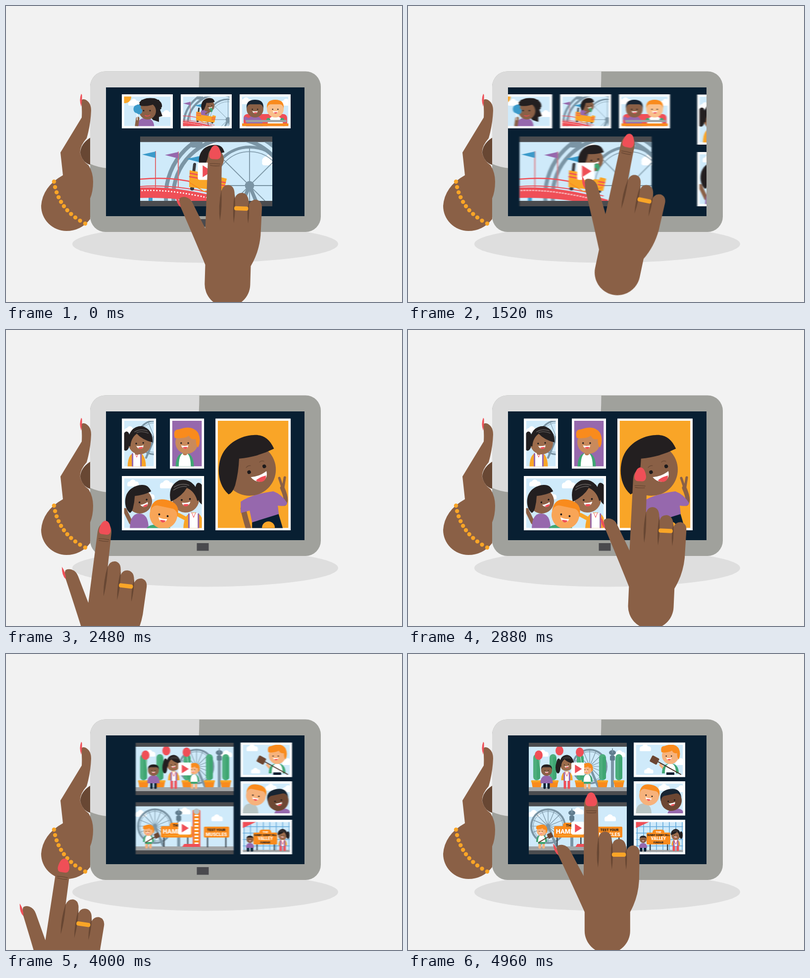
Write an HTML page that moves like this. It is 800 px wide and 600 px high and loops after 5 s.

```html
<!DOCTYPE html>
<html lang="en">
<head>
<meta charset="utf-8">
<title>Tablet photo album</title>
<style>
html, body { margin: 0; width: 100%; height: 100%; overflow: hidden; background: #f2f2f2; }
svg { display: block; }
#stage { width: 800px; height: 600px; }
text { font: 900 8px Roboto, sans-serif; text-anchor: middle; }
</style>
</head>
<body>
<svg id="stage" viewBox="0 0 800 600">
  <defs>
    <clipPath id="screen"><rect x="202" y="165" width="401" height="261"/></clipPath>
    <clipPath id="case"><rect x="170" y="132.500" width="466" height="325.500" rx="31"/></clipPath>
    <filter id="blur" filterUnits="userSpaceOnUse" x="180" y="160" width="446" height="270" color-interpolation-filters="sRGB">
      <feGaussianBlur id="smear" stdDeviation="0 0"/>
    </filter>
  </defs>
  <ellipse cx="402.500" cy="482.500" rx="268.500" ry="38" fill="#dedede"/>
  <g clip-path="url(#case)">
    <rect x="170" y="132" width="466" height="327" fill="#a0a19c"/>
    <path d="M170 132H390.500Q390.500 150 389.500 170L206 329Q185 327 170 320Z" fill="#dbdbdb"/>
  </g>
  <rect x="202" y="165" width="401" height="261" fill="#081f32"/>
  <rect x="385.500" y="432" width="24" height="15.500" fill="#4a4a4e"/>
  <g clip-path="url(#screen)"><g id="lens"><g id="strip"></g></g></g>
  <g id="holder"></g>
  <g id="pointer"></g>
</svg>
<script>
const $ = id => document.getElementById(id);
const DARK = '#8a6046', SHADE = '#684733', TAN = '#9c6c4c', FAIR = '#f6b27c';
const INK = '#231f20', NAVY = '#081f32', RED = '#ef4f57', GOLD = '#f9a527', GINGER = '#f98b1d';
const SKY = '#cfeafa', STEEL = '#7b95a5', PURPLE = '#9668ad', GREEN = '#3fa673', BLUE = '#3b9aca';

// Drawing helpers
const rect = (x, y, w, h, f, r = 0) => `<rect x="${x}" y="${y}" width="${w}" height="${h}" rx="${r}" fill="${f}"/>`;
const dot = (x, y, r, f, ry = r) => `<ellipse cx="${x}" cy="${y}" rx="${r}" ry="${ry}" fill="${f}"/>`;
const shape = (d, f) => `<path d="${d}" fill="${f}"/>`;
const line = (d, c, w, more = '') => `<path d="${d}" fill="none" stroke="${c}" stroke-width="${w}" stroke-linecap="round" ${more}/>`;
const group = (t, s) => `<g transform="${t}">${s}</g>`;
const label = (x, y, s, size, f) => `<text x="${x}" y="${y}" style="font-size:${size}px" fill="${f}">${s}</text>`;
const range = (n, fn) => Array.from({ length: n }, (_, i) => fn(i)).join('');
const crop = (x, y, w, h, bg, s) =>
  `<svg x="${x}" y="${y}" width="${w}" height="${h}" viewBox="${x} ${y} ${w} ${h}">${rect(x, y, w, h, bg)}${s}</svg>`;
const photo = (x, y, w, h, bg, s) => rect(x, y, w, h, '#fff') + crop(x + 4.5, y + 4.5, w - 9, h - 9, bg, s);
const video = (x, y, w, h, bar, s) =>
  rect(x, y, w, h, '#4b4c4f') + crop(x, y + bar, w, h - 2 * bar, SKY, s);
const cloud = (x, y, s = 1) => group(`translate(${x} ${y}) scale(${s})`,
  dot(-6, 0, 5, '#fff') + dot(0, -3, 6, '#fff') + dot(7, 0, 5, '#fff') + rect(-11, 0, 23, 5, '#fff', 2.5));
const play = (x, y, s) => rect(x - s / 2, y - s / 2, s, s, '#fff', s / 9) +
  shape(`M${x - s * .22} ${y - s * .34}L${x + s * .32} ${y}L${x - s * .22} ${y + s * .34}Z`, RED);
const torso = (x, y, w, h, f) =>
  shape(`M${x - w / 2} ${y + h}Q${x - w / 2} ${y} ${x} ${y}Q${x + w / 2} ${y} ${x + w / 2} ${y + h}Z`, f);

// Heads are drawn in a unit circle
const HAIR = {
  bob: 'M.93-.8C.75-1.2.5-1.35.15-1.32C-.35-1.3-.9-1-1.1-.45C-1.25 0-1.2.6-.8.95Q-.65.9-.55.6Q-.42.1-.4-.42Q.3-.48.93-.8Z',
  girl: 'M1.13-.1Q1.1-1.3.1-1.5Q-1.1-1.45-1.08.3L-.8.35Q-.8-.4-.3-.8Q.2-.3 1.13-.1Z',
  quiff: 'M-1.05-.4Q-1.25-1.15-.7-1.15Q.5-1.6 1-.85Q1.3-.2 1 .45Q.8.3.8-.3Q.35-.2.2-.6Q-.3-.3-1.05-.4Z',
  cap: 'M-1-.05Q-1.1-1.12 0-1.12Q1.1-1.12 1-.05Q.95-.5.6-.58L-.6-.58Q-.95-.5-1-.05Z'
};
const FACE = {
  bob: 'translate(.27 -.015) rotate(-21)',
  girl: 'translate(0 .02) rotate(-8)',
  quiff: 'translate(-.18 .05)',
  cap: 'translate(0 .02)'
};

function head(x, y, r, skin, hair, style, tilt = 0, flip = 1) {
  const girl = style === 'girl';
  const tail = girl ? dot(-1.2, -.1, .36, hair, .85) : '';
  const glint = girl ? line('M-.5-.95Q0-1.3.6-1.1M-.3-.9Q.1-1.1.7-.9', '#5f5a58', .06) : '';
  const face = group(FACE[style],
    dot(-.31, 0, .07, '#1d1a1b') + dot(.31, 0, .07, '#1d1a1b') +
    shape('M-.32.2Q0 .3.32.2Q.28.5.02.5Q-.22.48-.32.2Z', '#fff') +
    shape('M-.18.39Q0 .32.24.35Q.2.52.02.52Q-.1.5-.18.39Z', RED));
  return group(`translate(${x} ${y}) rotate(${tilt}) scale(${r * flip} ${r})`,
    tail + dot(0, 0, 1, skin) + shape(HAIR[style], hair) + glint + face);
}

function wheel(x, y, r, w, n = 8) {
  const spokes = range(n, i => {
    const a = i * Math.PI / n, c = Math.cos(a) * r, s = Math.sin(a) * r;
    return line(`M${x - c} ${y - s}L${x + c} ${y + s}`, STEEL, w * .3);
  });
  const ring = (q, k) => `<circle cx="${x}" cy="${y}" r="${q}" fill="none" stroke="${STEEL}" stroke-width="${k}"/>`;
  return ring(r, w) + ring(r * .88, w * .25) + spokes + dot(x, y, r * .12, STEEL) +
    line(`M${x - r * .5} ${y + r * 1.2}L${x} ${y}L${x + r * .5} ${y + r * 1.2}`, STEEL, w * 1.2);
}

const flag = (x, y, c, pole) => (pole ? line(`M${x} ${y}V367`, '#dd6f75', 2) : '') +
  shape(`M${x} ${y}L${x - 27} ${y + 6}L${x} ${y + 13}Z`, c);

// Roller coaster, drawn at video size and reused as a thumbnail
const coaster = cloud(537, 314, 1.8) + cloud(415, 285) +
  [132, 117].map(r => `<circle cx="455" cy="385" r="${r}" fill="none" stroke="${STEEL}" stroke-width="8"/>`).join('') +
  rect(372, 270, 25, 17, STEEL, 5) + wheel(492, 364, 78, 6, 4) +
  flag(302, 295, BLUE, 1) + flag(348, 296, PURPLE, 1) + flag(392, 304, BLUE) +
  line('M271 351Q335 345 385 359', RED, 2.5) + rect(288, 385, 8, 12, BLUE) +
  line('M271 366Q340 360 440 385', RED, 2) +
  shape('M271 368Q350 364 450 393V408Q350 386 271 389Z', RED) +
  line('M275 374Q345 371 440 397', '#fff', 3, 'stroke-dasharray="0 6"') +
  torso(400, 322, 27, 30, PURPLE) + head(417, 311, 23, DARK, INK, 'bob', 10) +
  dot(427, 327, 6, GREEN, 8) + line('M407 341L424 331', DARK, 6) +
  line('M381 321L379 338', '#3b3b3f', 6) + dot(376, 370, 4, '#3b3b3f') + dot(432, 375, 4, '#3b3b3f') +
  shape('M371 333L388 336L390 346L432 352L434 347L446 350L440 375L370 367Z', GOLD) +
  line('M372 339L387 342M371 346L388 349M431 356L443 358M430 362L442 364', RED, 2.5) +
  line('M371 358L400 376L438 368', GINGER, 2);

const pageA =
  photo(234, 179, 103, 69, SKY, cloud(324, 220) + cloud(258, 197) + dot(240, 184, 13, GOLD) +
    torso(282, 227, 35, 20, PURPLE) +
    shape('M269 196Q277 184 300 187Q317 193 315 205L310 207L316 223L309 225L309 235L297 231Z', INK) +
    dot(286, 213, 17, DARK) + shape('M268 202Q290 205 302 197L304 216L314 208L309 190L274 190Z', INK) +
    dot(278, 212, 1.6, INK) + dot(291, 212, 1.6, INK) + line('M281 222Q286 225 291 221', RED, 1.5) +
    line('M264 242L266 228', DARK, 7) + line('M265 231V215', '#fff', 1.5) +
    dot(264, 209, 6.5, BLUE, 8) + dot(269, 213, 6.5, BLUE) + dot(267, 205, 5.5, BLUE)) +
  photo(353, 179, 103, 69, SKY, group('translate(187.8 37.4) scale(.53)', coaster)) +
  photo(472, 179, 103, 69, SKY, cloud(485, 194) + cloud(566, 197) + rect(480, 219, 88, 25, RED, 8) +
    torso(502, 223, 34, 22, PURPLE) + torso(544, 223, 32, 22, '#fff') +
    head(503, 209, 17, DARK, '#172432', 'cap') + head(544, 209, 17, '#f9c08b', GINGER, 'cap') +
    dot(530, 231, 4, GREEN) + dot(558, 231, 4, GREEN) + line('M484 228L495 234', PURPLE, 7) +
    rect(484, 231, 83, 4.500, '#9fa4a5', 2) + rect(477, 238, 94, 8, GINGER)) +
  video(271, 264.5, 267, 141.5, 11, coaster) + play(405, 335, 35);

const jacket = (x, y, w, h) => torso(x, y, w, h, GOLD) + rect(x - w * .2, y + 1, w * .4, h, '#fff') +
  line(`M${x - w * .23} ${y + 3}V${y + h}M${x + w * .23} ${y + 3}V${y + h}`, PURPLE, 3) +
  line(`M${x - 4} ${y}L${x} ${y + 10}L${x + 4} ${y}`, RED, 1);
const tee = (x, y, w, h) => torso(x, y, w, h, GREEN) + torso(x, y, w * .66, h, '#fff');

const pageB =
  photo(234, 179.5, 69, 101.5, SKY, wheel(300, 218, 34, 3.5) + cloud(250, 204) +
    jacket(264, 248, 37, 30) + rect(260, 244, 9, 9, TAN, 4) + head(270, 229, 23, TAN, INK, 'girl', 3)) +
  photo(331, 179.5, 69, 101.5, PURPLE,
    tee(361, 249, 37, 29) + rect(357, 246, 9, 8, '#b97c51', 4) + head(365, 228, 23, '#c98a5c', GINGER, 'quiff')) +
  photo(234, 296, 166, 110, SKY, cloud(288, 338) + cloud(324, 315, 1.2) + cloud(256, 312) +
    line('M252 390L240 365', DARK, 8) + torso(269, 372, 38, 32, PURPLE) + head(270, 347, 25, DARK, INK, 'bob') +
    line('M349 375L366 384', GOLD, 8) + jacket(379, 370, 42, 36) +
    head(363, 343, 27, TAN, INK, 'girl', -15, -1) +
    torso(308, 394, 52, 14, GREEN) + head(318, 375, 28, '#f8a557', GINGER, 'cap', 12)) +
  photo(423, 179.5, 152, 226.5, GOLD,
    line('M479 362Q484 385 490 403', DARK, 11) +
    line('M562 352Q569 345 558 320', DARK, 9) +
    line('M558 318L552 300M560 318L563 299', DARK, 5) +
    shape('M497 386L550 371L560 405L497 407Z', NAVY) + dot(530, 401, 13, GOLD) +
    shape('M474 348Q495 333 540 327Q557 333 568 351Q566 359 549 356L551 373L497 390L492 366L474 371Z', PURPLE) +
    head(492, 283, 53, DARK, INK, 'bob') + line('M485 279Q489 274 494 275M512 268Q515 264 521 266', SHADE, 1.2));

const tower = (x, y, base) => rect(x - 3, y, 6, base - y, STEEL) + dot(x, y, 7, '#617d8e', 5) +
  rect(x - 5, y + 6, 10, 10, '#617d8e', 2) + line(`M${x} ${y}V${y - 8}`, STEEL, 2);
const tree = x => rect(x - 7, 203, 14, 53, '#4cae7d', 7) + rect(x, 208, 7, 46, GREEN, 4) +
  shape(`M${x - 11} 256H${x + 11}L${x + 8} 272H${x - 8}Z`, GINGER) + rect(x - 11, 256, 22, 4, GOLD);
const balloon = (x, y, hx) => line(`M${x} ${y}L${hx} 246`, '#fff', .8) + dot(x, y, 8, RED, 9.5);
const legs = (x, y, h, c) => line(`M${x - 4} ${y}V${y + h}M${x + 4} ${y}V${y + h}`, c, 5);
const post = (x, y, h) => rect(x, y, 2.5, h, '#3e4850');
const ground = (y, h) => rect(244, y, 198, h, '#a2a5a6');

const pageC =
  video(244, 180, 198, 106, 8, cloud(272, 203) + cloud(427, 204) + wheel(367, 228, 34, 4) + tower(413, 200, 270) +
    [260, 293, 348, 393, 426].map(tree).join('') + ground(270, 9) +
    balloon(264, 205, 269) + balloon(306, 196, 310) + balloon(347, 199, 354) +
    legs(280, 260, 11, NAVY) + torso(280, 246, 25, 16, PURPLE) + head(280, 236, 11, DARK, INK, 'cap') +
    legs(321, 254, 17, RED) + jacket(321, 238, 23, 18) + dot(303, 230, 5, INK, 12) + head(320, 224, 13, TAN, INK, 'girl') +
    legs(362, 258, 13, FAIR) + rect(355, 257, 14, 6, GREEN) + tee(362, 244, 22, 15) + head(362, 234, 10, FAIR, GINGER, 'quiff')) +
  play(343, 233, 26) +
  video(244, 300.5, 198, 105.5, 8, cloud(408, 334) + cloud(343, 320) + cloud(254, 325) +
    wheel(283, 349, 34, 4) + tower(331, 322, 391) + ground(390, 9) +
    post(300, 365, 26) + post(348, 365, 26) + rect(313, 342, 25, 15, GINGER, 5) + rect(295, 349, 64, 23, GINGER, 3) +
    label(326, 350, 'THE', 7, INK) + label(327, 364, 'HAMMER', 13, '#fff') + rect(302, 367, 49, 2, GOLD) +
    rect(360, 316, 14, 75, GINGER) + range(9, i => rect(363, 326 + i * 7, 8, 3, '#fff')) +
    line('M360 318V391M374 318V391', RED, 1.5) + dot(367, 319, 6, '#b8c4c9') + shape('M342 385H374V391H338Z', RED) +
    post(388, 370, 22) + post(425, 370, 22) + rect(382, 350, 51, 22, GINGER, 2) +
    label(407, 359, 'TEST YOUR', 7, INK) + label(407, 369, 'MUSCLES', 9.5, '#fff') +
    legs(270, 380, 12, FAIR) + rect(263, 379, 14, 6, GREEN) + tee(270, 367, 22, 14) +
    line('M264 382L286 369', '#5b3a29', 2) + group('rotate(-28 287 368)', rect(282, 363, 10, 10, '#6c4632', 1)) +
    head(270, 359, 10, FAIR, GINGER, 'quiff')) +
  play(343, 353, 26) +
  photo(456, 179.5, 104, 70, SKY, cloud(479, 192) + cloud(551, 220) + cloud(486, 238, .8) +
    line('M519 235L510 225', FAIR, 5) + tee(530, 222, 34, 20) + rect(522, 240, 16, 6, NAVY) +
    line('M499 215L551 244', '#4b3428', 2) + group('rotate(28 498 215)', rect(490, 208, 16, 14, '#6c4632', 2)) +
    head(530, 206, 17, FAIR, GINGER, 'quiff')) +
  photo(456, 258, 104, 69.5, SKY, cloud(517, 272) + cloud(552, 275) + torso(476, 303, 32, 22, '#b9c5c4') +
    torso(541, 313, 34, 14, PURPLE) + head(487, 287, 20, FAIR, GINGER, 'cap', 12) + head(532, 297, 21, '#6d4733', '#172432', 'cap', -12)) +
  photo(456, 336, 104, 70, SKY, range(8, i => line(`M${463 + i * 13} 341V402`, '#65aadb', 1.6)) +
    range(4, i => line(`M460 ${350 + i * 13}H556`, '#65aadb', 1.6)) + shape('M460 340H488L460 353Z', RED) +
    rect(460, 397, 97, 6, '#a2a5a6') + post(488, 383, 15) + post(523, 383, 15) +
    rect(494, 356, 24, 12, GINGER, 5) + rect(482, 362, 48, 24, GINGER, 2) + label(506, 363, 'THE', 6, '#fff') +
    label(506, 369, 'SUNNY SUNNY HILL', 5, INK) + label(506, 377, 'VALLEY', 8.5, '#fff') + label(506, 384, 'FUNFAIR', 5, INK) +
    legs(475, 391, 7, NAVY) + torso(475, 383, 16, 10, PURPLE) + head(475, 376, 7, DARK, INK, 'cap') +
    legs(541, 385, 12, RED) + jacket(541, 376, 17, 12) + head(541, 368, 9, TAN, INK, 'girl', 0, -1));

const GAP1 = 396, GAP2 = 410;
$('strip').innerHTML = pageA + group(`translate(${GAP1})`, pageB) + group(`translate(${GAP1 + GAP2})`, pageC);

// Hand holding the tablet, with beads along a quadratic curve
const bead = (a, b, c, u) => a * (1 - u) ** 2 + 2 * b * u * (1 - u) + c * u * u;
$('holder').innerHTML =
  shape('M170 267Q150 280 150 298Q154 317 170 322Z', SHADE) +
  shape('M152 193Q153 187 161 190Q172 196 172 212Q171 240 163 268Q148 285 150 299Q154 314 167 323Q176 338 176 356Q176 376 170 390V432Q151 456 122 456A51 51 0 0 1 71 405Q74 366 115 343L110 297L153 226Q154 208 152 193Z', DARK) +
  shape('M152 178Q147 190 152 204Q154 190 153.500 180Z', RED) +
  range(11, i => dot(bead(97, 105.5, 160, i / 10), bead(356, 413, 441, i / 10), 4.2, GOLD));

// Swiping hand, upright, moved so that the index nail is the pivot
$('pointer').innerHTML = group('translate(-369 -295)',
  shape('M354 450L355 304Q356 286 369 286Q382 286 383 304L384 373Q387 360 398 360Q410 361 411 378L412 386Q415 375 426 375Q438 376 440 392L441 398Q445 388 455 388Q467 390 467 404L466 460Q464 494 448 523V561A46 46 0 0 1 356 561V523Q334 474 303 408Q298 398 300 390Q304 386 312 387Q322 389 327 399Z', DARK) +
  shape('M384 370Q378 405 383 433Q387 405 384 370ZM411 378Q407 410 411 437Q415 410 411 378ZM440 392Q436 415 440 437Q443 415 440 392Z', SHADE) +
  line('M359 318Q369 317 380 318M360 321.500Q369 323 379 321.500', SHADE, 1.3) +
  shape('M369 280.500Q378 281 381 299Q381 308 374 308.500H364Q357 308 357.500 299Q360 281 369 280.500Z', RED) +
  shape('M292 384Q301 393 303 408Q294 402 292 384Z', RED) +
  rect(411, 402.5, 28.5, 8.5, GOLD, 4));

// Time in ms, nail x, nail y, tilt in degrees
const LOOP = 5000;
const POSES = [
  [0, 422, 297, 1.7], [600, 543, 238, 7], [1130, 543, 238, 9], [1520, 446, 273, 11.9],
  [2080, 127, 431, 11.3], [2260, 108, 440, 10], [2880, 469, 293, 2.5], [3060, 498, 285, 2.5],
  [3400, 437, 301, 1], [4000, 117, 429, 8.3], [4180, 95, 438, 8], [4480, 108, 432, 6], [4960, 369, 295, 0]
];
const N = POSES.length;
const at = i => {
  const [t, ...v] = POSES[(i + N) % N];
  return [t + LOOP * Math.floor(i / N), ...v];
};
const slope = (i, k) => (at(i + 1)[k] - at(i)[k]) / (at(i + 1)[0] - at(i)[0]);
const tangent = (i, k) => {
  const a = slope(i - 1, k), b = slope(i, k);
  return a * b > 0 ? 2 * a * b / (a + b) : 0;
};
function pose(t) {
  let i = N - 1;
  while (POSES[i][0] > t) i--;
  const p = at(i), q = at(i + 1), d = q[0] - p[0], u = (t - p[0]) / d, w = 1 - u;
  return [1, 2, 3].map(k => w * w * (1 + 2 * u) * p[k] + u * u * (3 - 2 * u) * q[k] +
    d * u * w * (w * tangent(i, k) - u * tangent(i + 1, k)));
}

const ease = (t, start, span) => {
  const p = Math.min(1, Math.max(0, (t - start) / span));
  return p < .5 ? 4 * p ** 3 : 1 - 4 * (1 - p) ** 3;
};
const scroll = t => GAP1 * ease(t, 1066, 1483) + GAP2 * ease(t, 3025, 1254);

function draw(t) {
  const [x, y, tilt] = pose(t);
  const speed = (scroll(t + 10) - scroll(t - 10)) / 20;
  $('pointer').setAttribute('transform', `translate(${x} ${y}) rotate(${tilt})`);
  $('strip').setAttribute('transform', `translate(${-scroll(t)})`);
  $('smear').setAttribute('stdDeviation', `${speed * 5} 0`);
  $('lens').setAttribute('filter', speed > .02 ? 'url(#blur)' : 'none');
}

const begin = performance.now();
function tick() {
  draw((performance.now() - begin) % LOOP);
  requestAnimationFrame(tick);
}
tick();
</script>
</body>
</html>
```
